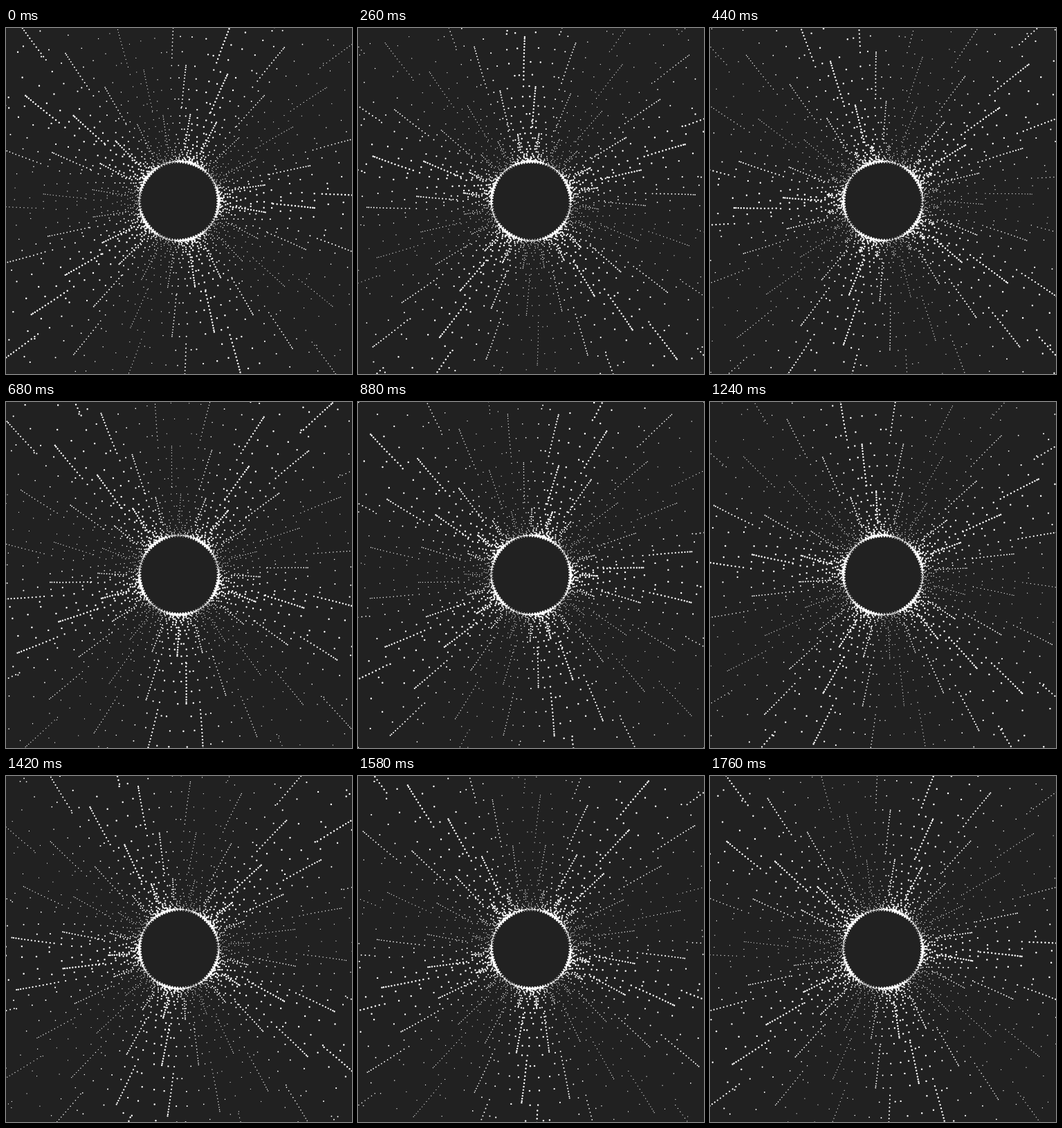
Recreate the animation shown at these times as an HTML page with a canvas. Size 500x500 px, loop 1780 ms.

```html
<!DOCTYPE html>
<html lang="en">
<head>
<meta charset="utf-8">
<title>Dotted rays</title>
<style>
html, body { margin: 0; width: 100%; height: 100%; overflow: hidden; background: #212121; }
canvas { display: block; width: 500px; height: 500px; }
</style>
</head>
<body>
<canvas id="stage" width="500" height="500"></canvas>
<script>
const ctx = document.getElementById('stage').getContext('2d');
const LOOP = 1780, STEP = 20, CYCLE = 1800;
const HOLE = 57;            // closest approach of the dots
const SPAN = 226;           // distance travelled in one cycle
const FAR = 3 * SPAN;
const SPOKES = 60, STREAK = 14, LOOSE = 12, RING = 90;
const TWIST = 4.5 / SPAN;   // degrees of turn per unit of distance
const RAD = Math.PI / 180;

const mod = (a, n) => ((a % n) + n) % n;

// Streaks fade into the crowd near the hole; loose dots slow down and gather there
const streakRadius = s => s < 45 ? 0 : Math.hypot(HOLE, s);
const looseRadius = s => HOLE + 310 * (s / FAR) ** 4;

function dot(r, deg, wave) {
  const a = deg * RAD;
  const x = 250 + r * Math.cos(a), y = 250 + r * Math.sin(a);
  if (x < -2 || x > 502 || y < -2 || y > 502) return;
  const size = 0.93 + 0.32 * Math.cos(5 * (deg - wave) * RAD);
  ctx.moveTo(x + size, y);
  ctx.arc(x, y, size, 0, 2 * Math.PI);
}

// Every copy of a dot along its curved path
function stream(pos, deg, wave, radius) {
  for (let s = mod(pos, SPAN); s < FAR; s += SPAN) {
    const r = radius(s);
    if (r) dot(r, deg + TWIST * s, wave);
  }
}

function draw(t) {
  const p = t / CYCLE;
  const wave = -144 * p;    // five bold sectors turning
  ctx.fillStyle = '#212121';
  ctx.fillRect(0, 0, 500, 500);
  ctx.fillStyle = '#fff';
  ctx.beginPath();

  for (let j = 0; j < SPOKES; j++) {
    const deg = j * 6 - 0.78;
    const end = 187.5 - j * SPAN / 3 - p * SPAN;
    for (let k = 0; k < STREAK; k++) {
      stream(end - 70 * (k / STREAK) ** 1.25, deg, wave, streakRadius);
    }
    for (let k = 0; k < LOOSE; k++) {
      const side = 18 * mod(k * k * 0.618 + 0.3, 1);
      stream(end + (k + 0.5) * SPAN / LOOSE, deg - side, wave, looseRadius);
    }
  }

  for (let i = 0; i < RING; i++) {
    const deg = i * 360 / RING;
    dot(55.5, deg, wave);
    dot(58, deg, wave);
  }
  ctx.fill();
}

function tick() {
  const t = performance.now() % LOOP;
  draw(Math.floor(t / STEP) * STEP);
  requestAnimationFrame(tick);
}
tick();
</script>
</body>
</html>
```
